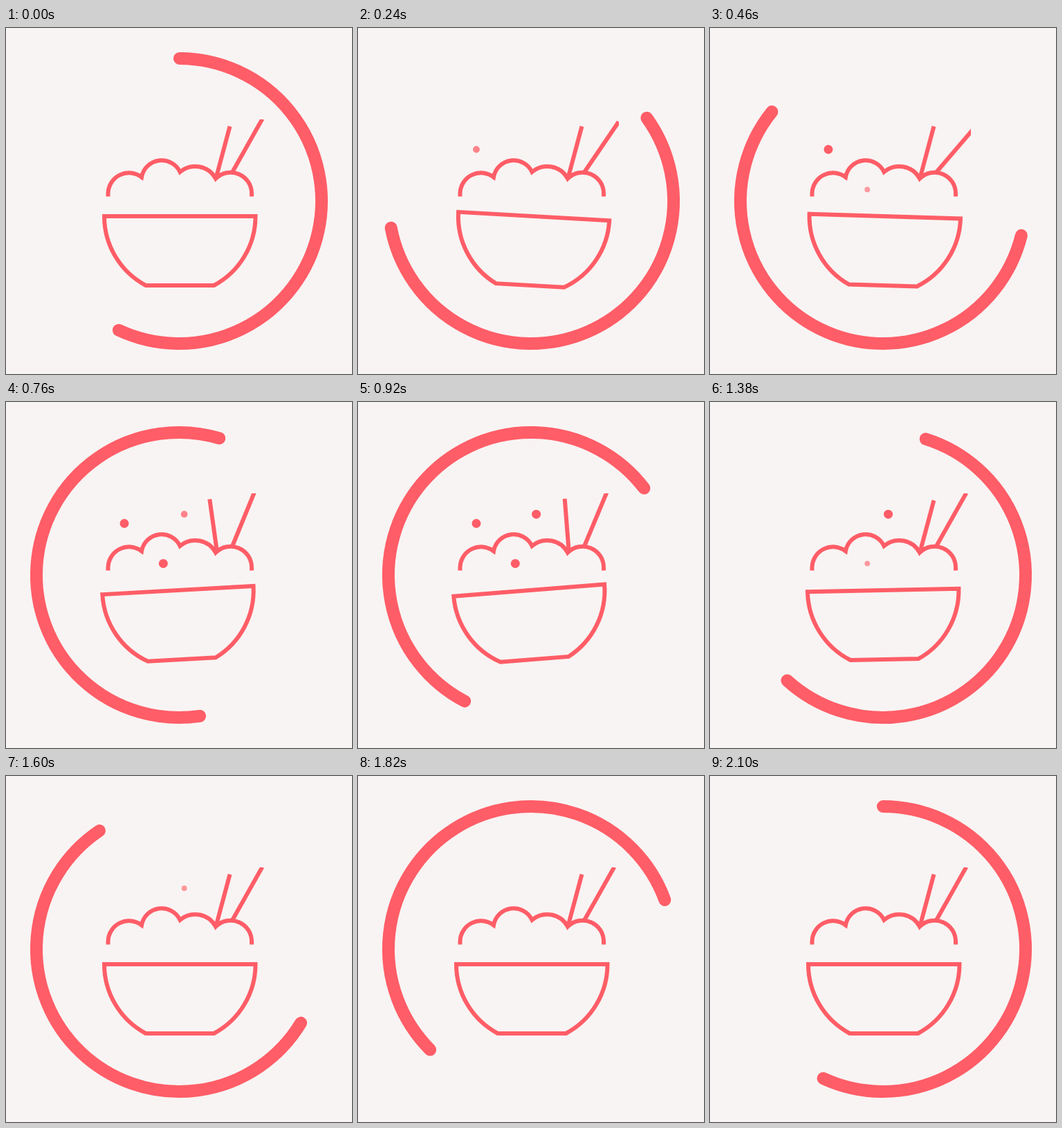
Animation of 500x500 px, one loop 2120 ms. Source, as an HTML page:

```html
<!DOCTYPE html>
<html lang="en">
<head>
<meta charset="utf-8">
<title>Rice bowl loader</title>
<style>
  html, body { margin: 0; width: 100%; height: 100%; overflow: hidden; background: #f8f4f3; }
  svg { display: block; width: 100vw; height: 100vh; fill: none; stroke: #ff5d67; stroke-width: 6; }
  circle { fill: #ff5d67; stroke: none; }
</style>
</head>
<body>
<svg viewBox="0 0 500 500">
  <clipPath id="frame"><path d="M100 132H377V300H100Z"/></clipPath>
  <path id="ring" d="M250 44A206 206 0 1 1 163.6 437" stroke-width="18" stroke-linecap="round"/>
  <g clip-path="url(#frame)">
    <path id="left" d="M304.5 213V139.6"/>
    <path id="right" d="M327 208.5V120.2"/>
  </g>
  <path d="M147.5 243.5V239A30.2 30.2 0 0 1 196 215.5A29.4 29.4 0 0 1 251.5 208A33.7 33.7 0 0 1 303 217.7A30.4 30.4 0 0 1 355 240V243.5"/>
  <path id="bowl" d="M142 272H360.5A113.3 113.3 0 0 1 300.5 372H202A113.3 113.3 0 0 1 142 272Z"/>
  <circle cx="171" cy="175.5" r="6.5"/>
  <circle cx="227.3" cy="233.4" r="6.5"/>
  <circle cx="257.6" cy="162.2" r="6.5"/>
</svg>
<script>
const LOOP = 2120, END = 2100;
const linear = p => p;
const smooth = p => (1 - Math.cos(Math.PI * p)) / 2;

// Value at time t along [time, value] keys
function track(t, keys, ease) {
  if (t <= keys[0][0]) return keys[0][1];
  for (let i = 1; i < keys.length; i++) {
    const [t0, a] = keys[i - 1], [t1, b] = keys[i];
    if (t < t1) return a + (b - a) * ease((t - t0) / (t1 - t0));
  }
  return keys[keys.length - 1][1];
}

const ringTurn = [[0, 0], [1113, 251], [2107, 720]];
const bowlTilt = [[0, 0], [260, 3.3], [955, -4.6], [1600, 0]];
const leftTilt = [[460, 15], [780, -8.2], [1320, 15]];
const rightTilt = [[120, 29.4], [400, 41.7], [800, 21.8], [1360, 29.4]];
const dotTimes = [[45, 1053], [304, 1276], [565, 1500]];
const FADE = 260;

const dots = document.querySelectorAll("circle");
const turn = (id, angle, x, y) =>
  document.getElementById(id).setAttribute("transform", `rotate(${angle} ${x} ${y})`);

function draw(now) {
  let t = now % LOOP;
  if (t >= END) t = 0;
  turn("ring", track(t, ringTurn, linear), 250, 250);
  turn("bowl", track(t, bowlTilt, smooth), 251.2, 323);
  turn("left", track(t, leftTilt, smooth), 304.5, 213);
  turn("right", track(t, rightTilt, smooth), 327, 208.5);
  dots.forEach((dot, i) => {
    const [on, off] = dotTimes[i];
    const size = track(t, [[on, 0], [on + FADE, 1], [off, 1], [off + FADE, 0]], linear);
    dot.setAttribute("r", 6.5 * size);
    dot.setAttribute("opacity", size);
  });
}

const start = performance.now();
function tick() {
  draw(performance.now() - start);
  requestAnimationFrame(tick);
}
tick();
</script>
</body>
</html>
```
